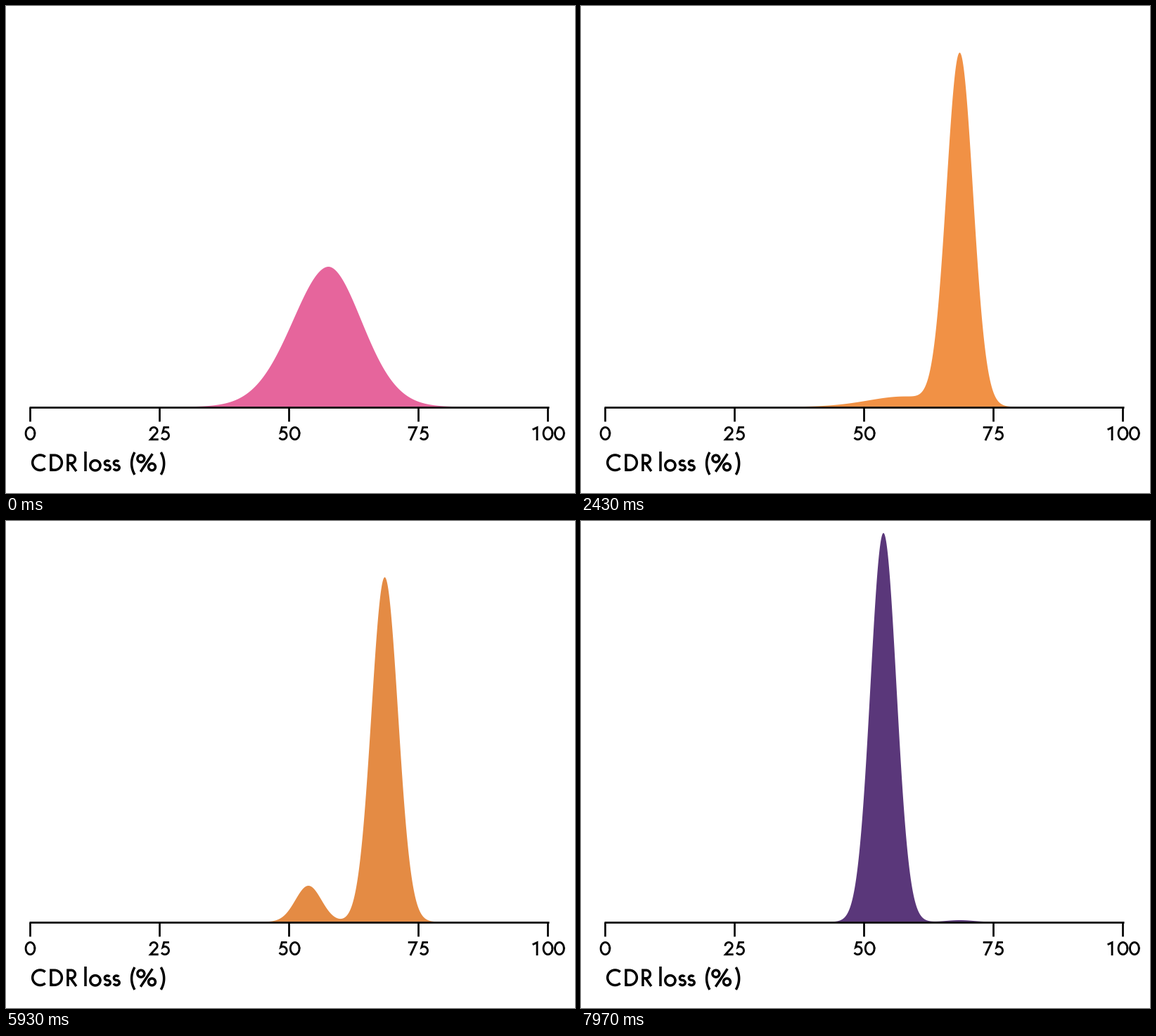
A matplotlib script that plays this animation: 809x693 px, repeating every 8000 ms.

```python
import numpy as np
import matplotlib.pyplot as plt
from matplotlib.animation import FuncAnimation
from matplotlib.patches import Polygon

W, H, DPI = 809, 693, 64
LOOP, TICK = 8000, 20
STEP = 100 / 3                  # the picture moves at 30 steps per second
MORPH = 100 * STEP
STARTS = (-STEP / 2, 5000 - STEP / 2)
BASE, LEFT, RIGHT = 570.5, 34.5, 770.5
LINE = 2.7

fig = plt.figure(figsize=(W / DPI, H / DPI), dpi=DPI, facecolor="white")
ax = fig.add_axes([0, 0, 1, 1])
ax.set_xlim(0, W)
ax.set_ylim(H, 0)
ax.axis("off")


def stroke(pts, width):
    x, y = np.transpose(pts)
    ax.plot(x, y, color="black", lw=width * 72 / DPI, zorder=3,
            solid_capstyle="butt", solid_joinstyle="miter")


def arc(cx, cy, rx, ry=None, a0=0, a1=366):
    """Points on an ellipse, angles in degrees, y upwards."""
    a = np.radians(np.linspace(a0, a1, 60))
    return [*zip(cx + rx * np.cos(a), cy + (ry or rx) * np.sin(a))]


def glyph(ch):
    """Advance and strokes of a geometric letter, in cap heights."""
    lo, hi = 0.07, 0.93
    match ch:
        case "0":
            return 0.82, [arc(0.41, 0.5, 0.32, 0.43)]
        case "1":
            return 0.82, [[(0.14, 0.77), (0.46, 0.92), (0.46, 0)]]
        case "2":
            return 0.82, [arc(0.4, 0.69, 0.25, 0.24, 185, -35)
                          + [(0.17, lo), (0.73, lo)]]
        case "5":
            return 0.82, [[(0.67, hi), (0.31, hi), (0.22, 0.58)]
                          + arc(0.37, 0.35, 0.28, 0.28, 112, -148)]
        case "7":
            return 0.82, [[(0.08, hi), (0.67, hi), (0.24, 0)]]
        case "C":
            return 1.06, [arc(0.51, 0.5, 0.44, 0.44, 48, 312)]
        case "D":
            return 0.98, [[(0.2, lo), (0.08, lo), (0.08, hi)]
                          + arc(0.28, 0.5, 0.43, 0.43, 90, -90)
                          + [(0.08, lo)]]
        case "R":
            return 0.55, [[(0.08, 0), (0.08, hi)]
                          + arc(0.27, 0.695, 0.235, 0.235, 90, -90)
                          + [(0.08, 0.46)],
                          [(0.24, 0.46), (0.57, 0)]]
        case "l":
            return 0.29, [[(0.06, 0), (0.06, 1.14)]]
        case "o":
            return 0.82, [arc(0.34, 0.335, 0.29)]
        case "s":
            return 0.53, [arc(0.22, 0.48, 0.15, 0.13, 30, 270)
                          + arc(0.22, 0.205, 0.17, 0.145, 90, -160)]
        case "(":
            return 0.37, [arc(1.34, 0.45, 1.26, 1.26, 149, 211)]
        case ")":
            return 0.37, [arc(-0.98, 0.45, 1.26, 1.26, 31, -31)]
        case "%":
            return 1.31, [arc(0.25, 0.73, 0.2), arc(0.89, 0.25, 0.2),
                          [(0.92, 1.01), (0.23, -0.03)]]
    return 0.49, []


def write(text, x, y, cap, centre=False):
    if centre:
        x -= cap * sum(glyph(ch)[0] for ch in text) / 2
    for ch in text:
        advance, strokes = glyph(ch)
        for pts in strokes:
            stroke([(x + cap * u, y - cap * v) for u, v in pts], 0.143 * cap)
        x += cap * advance


for value in range(0, 101, 25):
    x = LEFT + (RIGHT - LEFT) * value / 100
    stroke([(x, BASE), (x, 590.5)], LINE)
    write(str(value), x, 618.2, 20, centre=True)
stroke([(LEFT - LINE / 2, BASE), (RIGHT + LINE / 2, BASE)], LINE)
write("CDR loss (%)", 36, 662, 24.5)


def bell(mid, height, left, right, power=2):
    sigma = np.where(xs < mid, left, right)
    return height * np.exp(-0.5 * np.abs((xs - mid) / sigma) ** power)


xs = np.linspace(LEFT, RIGHT, 1473)
CURVES = [
    bell(458.5, 199.5, 51.2, 47.5, 1.9),
    bell(538.5, 540.5, 18.9, 18.9),
    bell(430, 556, 18.5, 18.5),
]
COLORS = np.array([(230, 101, 156), (242, 148, 62), (89, 55, 122)]) / 255

hill = ax.add_patch(Polygon([(0, BASE), (1, BASE), (1, BASE)],
                            closed=True, lw=0, zorder=2))


def ease(t):
    t = min(max(t, 0), 1)
    return 4 * t ** 3 if t < 0.5 else 1 - 4 * (1 - t) ** 3


def draw(frame):
    # hold each step, sampled in the middle of the tick
    now = np.floor((frame * TICK + TICK / 2 + 3.4) / STEP) * STEP
    k = int(now >= STARTS[1])
    p = ease((now - STARTS[k]) / MORPH)
    ys = BASE - ((1 - p) * CURVES[k] + p * CURVES[k + 1])
    hill.set_xy([(LEFT, BASE), *zip(xs, ys), (RIGHT, BASE)])
    hill.set_facecolor((1 - p) * COLORS[k] + p * COLORS[k + 1])
    return [hill]


anim = FuncAnimation(fig, draw, frames=LOOP // TICK, interval=TICK,
                     init_func=lambda: draw(0), repeat=True, repeat_delay=0)
plt.show()
```
